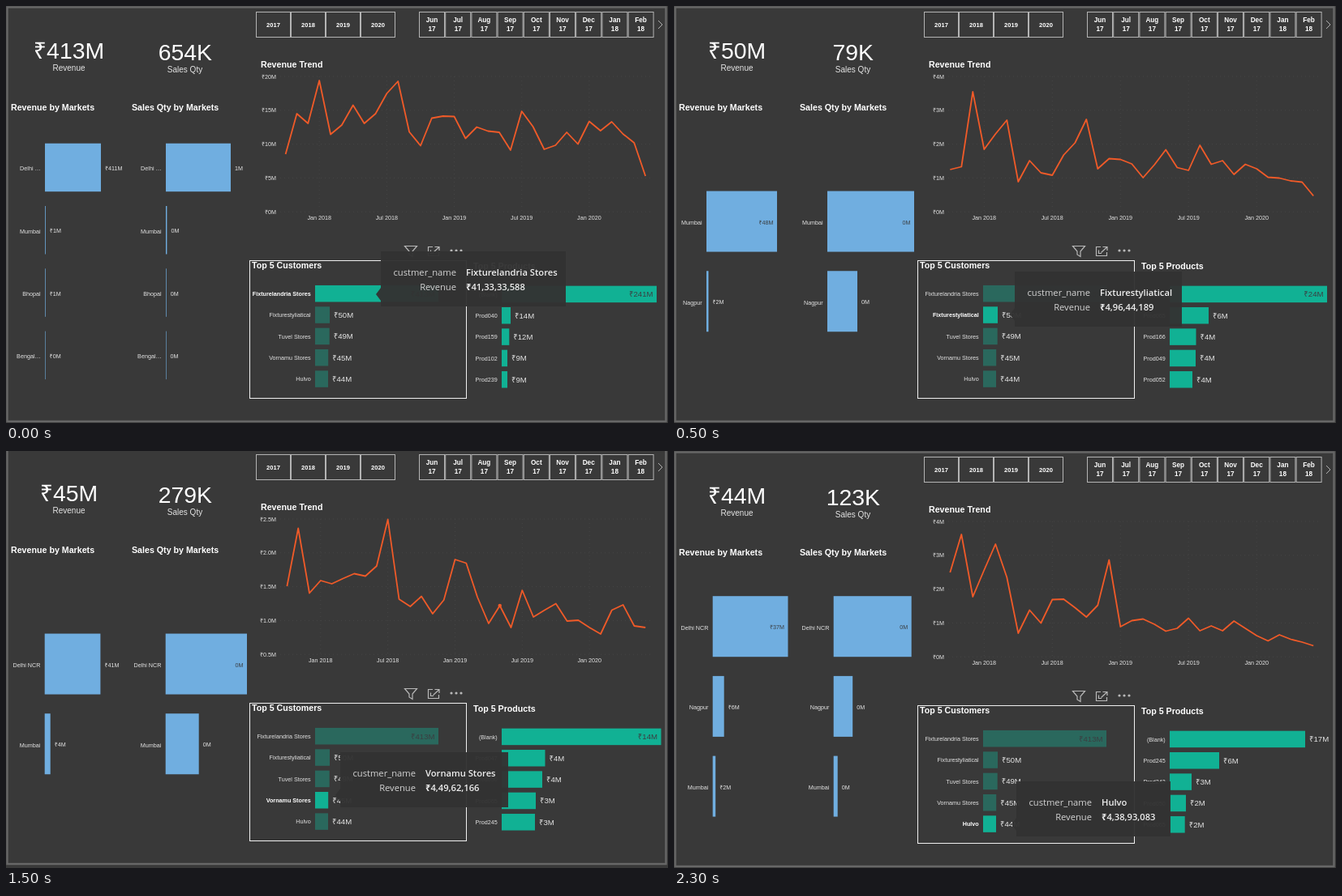
An HTML page for the animation above (2500 ms loop, 816x515 px).

```html
<!DOCTYPE html>
<html lang="en">
<head>
<meta charset="utf-8">
<title>Sales dashboard</title>
<style>
  html, body { margin: 0; width: 100%; height: 100%; overflow: hidden; background: #393939; }
  svg { display: block; font-family: "Liberation Sans", Arial, sans-serif; fill: #e4e4e4; }
  .title { font-size: 10.67px; font-weight: 700; fill: #fff; }
  .kpi { font-size: 28.4px; fill: #fff; }
  .sub { font-size: 10px; }
  .small { font-size: 7.2px; }
  .strong { font-weight: 700; fill: #fff; }
  .value { font-size: 9.6px; }
  .dark { fill: #3b3f42; }
  .year { font-size: 7.6px; font-weight: 700; fill: #fff; }
  .month { font-size: 8.2px; font-weight: 700; fill: #fff; }
  .tip { font-family: "Open Sans", "Noto Sans", sans-serif; font-size: 11.2px; fill: #d4d4d4; }
  .tip .strong { font-weight: 600; fill: #f0f0f0; }
</style>
</head>
<body>
<svg id="stage" width="816" height="515" viewBox="0 0 816 515"></svg>
<script>
const STEP = 500;
const BLUE = '#70aee0', GREEN = '#11b194', DIM = '#2a685d', ORANGE = '#f05a28';

const customers = [
  ['Fixturelandria Stores', 152, '₹413M'],
  ['Fixturestyliatical', 18, '₹50M'],
  ['Tuvel Stores', 17.7, '₹49M'],
  ['Vornamu Stores', 16.2, '₹45M'],
  ['Hulvo', 16, '₹44M']
];

const text = (x, y, str, cls, anchor = 'start') =>
  `<text x="${x}" y="${y}" class="${cls}" text-anchor="${anchor}">${str}</text>`;
const rect = (x, y, w, h, attrs) =>
  `<rect x="${x}" y="${y}" width="${w}" height="${h}" ${attrs}/>`;
const path = (d, attrs) => `<path d="${d}" fill="none" ${attrs}/>`;

// One horizontal bar with its category and value; long bars hold the value inside.
function bar(row, o) {
  const [label, w, value] = row;
  const end = o.x + w, inside = end > o.limit;
  return rect(o.x, o.cy - o.h / 2, w, o.h, `fill="${o.color}"`) +
    text(o.x - 5.3, o.cy + o.drop, label, o.bold ? 'small strong' : 'small', 'end') +
    text(inside ? end - 4.5 : end + 5, o.cy + o.drop + (o.cls === 'value' ? .6 : -.4), value,
      o.cls + (inside ? ' dark' : ''), inside ? 'end' : 'start');
}

function markets(rows, x, limit) {
  const n = rows.length;
  const pitch = n === 4 ? 77.3 : 98.7, h = n === 4 ? 59.5 : 75;
  return rows.map((row, i) => bar(row, {
    x, limit, h, cy: 315.4 + (i - (n - 1) / 2) * pitch, drop: 4, color: BLUE, cls: 'small'
  })).join('');
}

function topFive(rows, x, cy, limit, picked) {
  return rows.map((row, i) => bar(row, {
    x, limit, h: 20.5, cy: cy + i * 26.35, drop: 2.8, cls: 'value', bold: i === picked,
    color: picked === undefined || i === picked ? GREEN : DIM
  })).join('');
}

function slicers() {
  const frame = 'fill="none" stroke="#b4b4b4" stroke-width="1"';
  const years = [2017, 2018, 2019, 2020].map((y, i) =>
    rect(308.5 + 43 * i, 7.5, 42, 31, frame) + text(329.5 + 43 * i, 25.6, y, 'year', 'middle'));
  const months = 'Jun Jul Aug Sep Oct Nov Dec Jan Feb'.split(' ').map((m, i) => {
    const x = 509.5 + 32.2 * i;
    return rect(x, 7.5, 31, 31, frame) + text(x + 15.5, 20, m, 'month', 'middle') +
      text(x + 15.5, 31, i < 7 ? 17 : 18, 'month', 'middle');
  });
  return years.join('') + months.join('') + path('M804 18l5 5l-5 5', 'stroke="#b0b0b0"');
}

function trend(s) {
  const step = (788.2 - s.x0) / 32, at = i => s.x0 + i * step;
  const grid = 'stroke="#454545" stroke-dasharray="1 4"';
  const rows = s.axis.map((v, i) => {
    const y = 87 + i * (s.gap || 41.8);
    return path(`M338 ${y}H797`, grid) + text(333, y + 2.6, v, 'small', 'end');
  });
  const cols = ['Jan 2018', 'Jul 2018', 'Jan 2019', 'Jul 2019', 'Jan 2020'].map((v, i) => {
    const x = at(3 + 6 * i);
    return path(`M${x} 87V254`, grid) + text(x, 264.3, v, 'small', 'middle');
  });
  const line = s.line.map((y, i) => `${at(i).toFixed(1)} ${y}`).join('L');
  const dot = s.dot ? `<circle cx="${at(s.dot)}" cy="${s.line[s.dot]}" r="2.2" fill="${ORANGE}"/>` : '';
  return rows.join('') + cols.join('') +
    path('M' + line, `stroke="${ORANGE}" stroke-width="1.8" stroke-linejoin="round"`) + dot;
}

function icons() {
  const pen = 'stroke="#b8b8b8" stroke-width="1.2"';
  return path('M491.5 296.5H506.5L501 303V309.5L497 307V303Z', pen) +
    path('M526 297.5H520.5V308.5H533.5V304M528.5 297.5H534V302M534 297.5L526.5 304.5M523.5 301.5V305.5H527', pen) +
    [549, 555, 561].map(x => `<circle cx="${x}" cy="302" r="1.6" fill="#b8b8b8"/>`).join('');
}

function tooltip([x, y, right], name, amount) {
  const c = y + 53;
  return `<g class="tip">` +
    path(`M${x} ${y}H${right}V${y + 68}H${x}V${c + 8}L${x - 6} ${c}L${x} ${c - 8}Z`,
      'style="fill:#323232;fill-opacity:.96"') +
    text(x + 93, y + 30, 'custmer_name', '', 'end') +
    text(x + 93, y + 48, 'Revenue', '', 'end') +
    text(x + 105, y + 30, name, 'strong') +
    text(x + 105, y + 48, amount, 'strong') + '</g>';
}

function scene(s, i) {
  return `<g visibility="hidden"><g transform="translate(0 ${s.shift || 0})">` +
    rect(1.5, 1.5, 812, 511.5, 'fill="none" stroke="#676767" stroke-width="2.4"') +
    slicers() +
    text(77.5, 65.3, s.revenue, 'kpi', 'middle') + text(77.5, 80, 'Revenue', 'sub', 'middle') +
    text(220.8, 67, s.qty, 'kpi', 'middle') + text(220.5, 82, 'Sales Qty', 'sub', 'middle') +
    text(6, 129, 'Revenue by Markets', 'title') +
    text(155, 129, 'Sales Qty by Markets', 'title') +
    text(314, 76, 'Revenue Trend', 'title') +
    markets(s.left, s.mx || 48, 120) + markets(s.right, (s.mx || 48) + 149, 285) +
    trend(s) + icons() +
    rect(300.5, 314.5, 267, 170, 'fill="none" stroke="#f0f0f0"') +
    text(303, 324, 'Top 5 Customers', 'title') +
    text(576, 325, 'Top 5 Products', 'title') +
    topFive(customers, 381, 355.2, 500, i) +
    topFive(s.products, 611, 355.9, 790) +
    '</g>' + tooltip(s.tip, customers[i][0], s.amount) + '</g>';
}

const first = {
  revenue: '₹413M', qty: '654K', amount: '₹41,33,33,588', tip: [462, 303, 690],
  left: [['Delhi …', 69, '₹411M'], ['Mumbai', .8, '₹1M'], ['Bhopal', .7, '₹1M'], ['Bengal…', .6, '₹0M']],
  right: [['Delhi …', 80, '1M'], ['Mumbai', 1.4, '0M'], ['Bhopal', .7, '0M'], ['Bengal…', .6, '0M']],
  products: [['(Blank)', 191, '₹241M'], ['Prod040', 11, '₹14M'], ['Prod159', 9.3, '₹12M'],
    ['Prod102', 7, '₹9M'], ['Prod239', 7, '₹9M']],
  x0: 344.6, axis: ['₹20M', '₹15M', '₹10M', '₹5M', '₹0M'],
  line: [183, 133, 145, 92, 158.5, 147, 122.5, 145, 133, 108, 93, 155.5, 172.5, 138.5, 136, 136.5, 163.5,
    149.5, 154.5, 156, 178, 130, 149, 177, 172, 156, 170.5, 142.5, 154, 143, 158, 169, 210]
};

const second = {
  revenue: '₹50M', qty: '79K', amount: '₹4,96,44,189', tip: [420, 328, 626], mx: 40,
  left: [['Mumbai', 87, '₹48M'], ['Nagpur', 2.5, '₹2M']],
  right: [['Mumbai', 107, '0M'], ['Nagpur', 37, '0M']],
  products: [['(Blank)', 194, '₹24M'], ['Prod065', 48, '₹6M'], ['Prod166', 32.5, '₹4M'],
    ['Prod049', 32, '₹4M'], ['Prod052', 28, '₹4M']],
  x0: 340.3, axis: ['₹4M', '₹3M', '₹2M', '₹1M', '₹0M'],
  line: [202, 198.5, 106, 177, 158, 141, 217, 191, 206, 209, 184, 169, 140, 201, 188.5, 189.5, 195,
    212, 196, 177.5, 199.5, 203, 172, 195.5, 191, 208, 195.5, 201, 211.5, 212.5, 216, 217.5, 234.5]
};

const third = {
  revenue: '₹49M', qty: '139K', amount: '₹4,91,15,620', tip: [413, 354, 599],
  left: [['Ahme…', 79, '₹31M'], ['Mumbai', 26, '₹10M'], ['Hyder…', 19, '₹7M'], ['Bengal…', .6, '₹0M']],
  right: [['Hyder…', 98, '0M'], ['Ahme…', 62, '0M'], ['Mumbai', 14, '0M'], ['Bengal…', .6, '0M']],
  products: [['(Blank)', 187.5, '₹19M'], ['Prod047', 36, '₹4M'], ['Prod050', 30.5, '₹3M'],
    ['Prod065', 27, '₹3M'], ['Prod131', 26, '₹3M']],
  x0: 340.3, axis: ['₹3M', '₹2M', '₹1M'], gap: 67,
  line: [149, 185, 219, 202, 226, 139.5, 146.5, 187, 164, 203, 172.5, 200, 164, 202, 236, 210, 190,
    186, 214.5, 180, 158, 191.5, 192, 135, 166.5, 191, 197, 225, 107, 190.5, 220, 219, 234]
};

const fourth = {
  revenue: '₹45M', qty: '279K', amount: '₹4,49,62,166', tip: [412, 372, 619], shift: -3, mx: 47.7,
  left: [['Delhi NCR', 68.7, '₹41M'], ['Mumbai', 7, '₹4M']],
  right: [['Delhi NCR', 100.3, '0M'], ['Mumbai', 41, '0M']],
  products: [['(Blank)', 196.5, '₹14M'], ['Prod047', 53.5, '₹4M'], ['Prod050', 50, '₹4M'],
    ['Prod065', 42, '₹3M'], ['Prod245', 41, '₹3M']],
  x0: 346.4, axis: ['₹2.5M', '₹2.0M', '₹1.5M', '₹1.0M', '₹0.5M'], dot: 19,
  line: [170, 98.5, 178.5, 163, 167, 160.5, 154.5, 157.5, 145, 87.5, 186, 195, 182.5, 204, 187, 137, 141.5,
    183.5, 216, 194, 221, 175, 208, 199.5, 191.5, 213, 212, 221, 229, 199.5, 193, 219, 221]
};

const fifth = {
  revenue: '₹44M', qty: '123K', amount: '₹4,38,93,083', tip: [422, 408, 612], mx: 47.7,
  left: [['Delhi NCR', 92.8, '₹37M'], ['Nagpur', 14, '₹6M'], ['Mumbai', 3.5, '₹2M']],
  right: [['Delhi NCR', 96, '0M'], ['Nagpur', 23.5, '0M'], ['Mumbai', 5, '0M']],
  products: [['(Blank)', 167, '₹17M'], ['Prod245', 61, '₹6M'], ['Prod243', 27, '₹3M'],
    ['Prod050', 20, '₹2M'], ['Prod065', 18.7, '₹2M']],
  x0: 340.3, axis: ['₹4M', '₹3M', '₹2M', '₹1M', '₹0M'],
  line: [150, 103, 180, 147, 115, 156, 225, 196.5, 212.5, 183.5, 183, 193.5, 205, 190.5, 134.5, 217, 209.5,
    207.5, 214, 222.5, 219, 206.5, 222, 216, 222, 210, 219, 228, 234.5, 227, 232.5, 236, 240.5]
};

const stage = document.getElementById('stage');
stage.innerHTML = [first, second, third, fourth, fifth].map(scene).join('');
const views = [...stage.children];
const start = performance.now();

function draw(now) {
  const current = Math.floor(Math.max(0, now - start) / STEP) % views.length;
  views.forEach((v, i) => v.setAttribute('visibility', i === current ? 'visible' : 'hidden'));
  requestAnimationFrame(draw);
}
draw(start);
</script>
</body>
</html>
```
